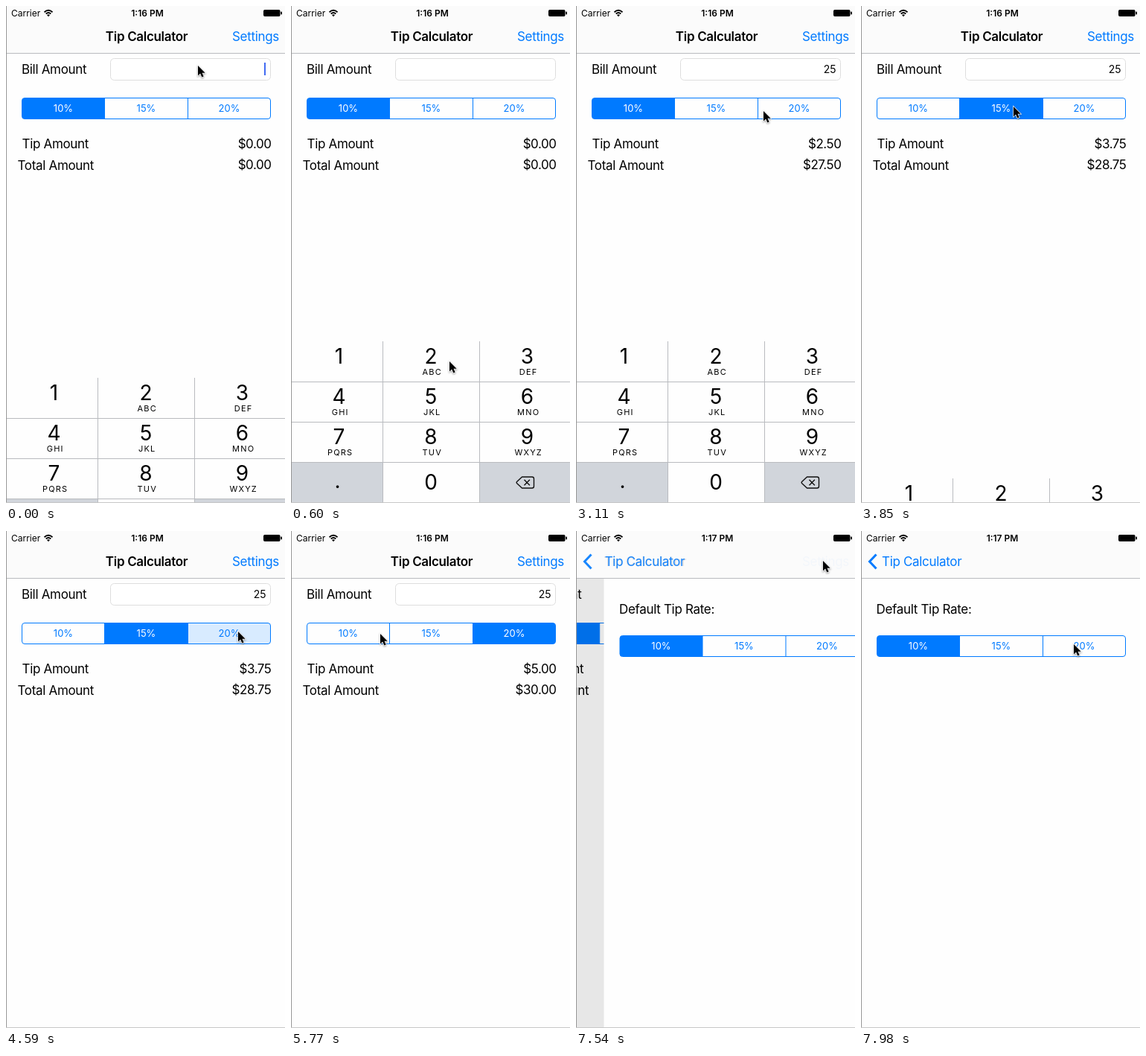
An HTML page for the animation above (8 s loop, 375 by 667 pixels).

```html
<!DOCTYPE html>
<html lang="en">
<head>
<meta charset="utf-8">
<title>Tip Calculator</title>
<style>
  html, body { margin: 0; width: 100%; height: 100%; overflow: hidden; background: #fefefe; }
  svg { display: block; width: 375px; height: 667px; font-family: Inter, Roboto, sans-serif; }
  .body { font-size: 17px; letter-spacing: -.32px; }
  .money { font-size: 17px; letter-spacing: -.45px; text-anchor: end; }
  .title { font-weight: 600; }
  .link { fill: #007aff; }
  .mid { text-anchor: middle; }
  .seg { font-size: 13px; text-anchor: middle; }
  .digit { font-size: 28px; text-anchor: middle; }
  .letters { font-size: 11px; letter-spacing: 1.2px; text-anchor: middle; }
  .status { font-size: 12px; }
  .line { fill: none; stroke: #b9bbbf; }
</style>
</head>
<body>
<svg id="stage" viewBox="0 0 375 667"></svg>
<script>
const LOOP = 8000, BLUE = '#007aff', KEY_GRAY = '#d1d5db';
const RATES = [10, 15, 20], SEG_X = [21.5, 132.5, 244.5, 355.5];
const COL_X = [1, 123.5, 253.5, 375], ROW_Y = [449, 504.5, 558.5, 612.5, 667];

// Each track is a list of [time, value]; a value holds until the next time.
const tracks = {
  cursor: [
    [0, [258, 80]], [150, [252, 160]], [300, [234, 320]], [450, [218, 440]], [600, [213, 477]],
    [740, [209, 477]], [890, [207, 476]], [1490, [207, 484]], [1640, [206, 502]],
    [1780, [204, 520]], [1930, [202, 530]], [2080, [201, 533]], [2820, [214, 440]],
    [2970, [240, 250]], [3110, [252, 141]], [3260, [218, 136]], [3410, [205, 135]],
    [4000, [225, 135]], [4150, [285, 135]], [4290, [312, 135]],
    [5340, [290, 136]], [5490, [205, 138]], [5640, [120, 138]], [5780, [84, 137]],
    [6220, [92, 136]], [6360, [160, 130]], [6500, [247, 98]], [6650, [301, 63]],
    [6800, [326, 45]], [6950, [332, 40]], [7690, [327, 62]], [7840, [302, 126]], [7980, [286, 152]]
  ],
  keypad: [[0, 49], [150, 14], [300, 3], [450, 0], [3700, 90], [3850, 184], [4000, 230]],
  caret: [[0, 1], [450, 0], [890, 1], [1640, 0], [2080, 1], [2970, 0], [3410, 1], [3560, 0]],
  bill: [[0, ''], [1190, '2'], [2530, '25']],
  key: [[0, ''], [1040, '2'], [1190, ''], [2380, '5'], [2530, '']],
  rate: [[0, 0], [3560, 1], [4740, 2], [6070, 0]],
  pressed: [[0, -1], [3410, 1], [3560, -1], [4590, 2], [4740, -1], [5930, 0], [6070, -1]],
  settings: [[0, 1], [7100, .3]],
  clock: [[0, '1:16 PM'], [7100, '1:17 PM']],
  push: [[0, 0], [7240, .08], [7390, .5], [7540, .9], [7690, .985], [7840, 1]]
};
const at = (track, time) => track.findLast(step => step[0] <= time)[1];

const text = (x, y, cls, content, id = '') =>
  `<text x="${x}" y="${y}" class="${cls}"${id && ` id="${id}"`}>${content}</text>`;
const rect = (x, y, w, h, fill, extra = '') =>
  `<rect x="${x}" y="${y}" width="${w}" height="${h}" fill="${fill}" ${extra}/>`;

function segments(y, name) {
  const fills = RATES.map((_, i) =>
    rect(SEG_X[i], y, SEG_X[i + 1] - SEG_X[i], 28, 'none', `id="${name}Fill${i}"`)).join('');
  const labels = RATES.map((rate, i) =>
    text((SEG_X[i] + SEG_X[i + 1]) / 2, y + 18.7, 'seg', rate + '%', name + 'Label' + i)).join('');
  return `<clipPath id="${name}Clip">${rect(21.5, y, 334, 28, '#000', 'rx="3.5"')}</clipPath>
    <g clip-path="url(#${name}Clip)">${fills}</g>
    ${rect(21.5, y, 334, 28, 'none', `rx="3.5" stroke="${BLUE}"`)}
    <path d="M132.5 ${y}v28M244.5 ${y}v28" stroke="${BLUE}"/>${labels}`;
}

function keypad() {
  const letters = ['', 'ABC', 'DEF', 'GHI', 'JKL', 'MNO', 'PQRS', 'TUV', 'WXYZ'];
  const centers = [64.5, 188, 317.5];
  const keys = letters.map((label, i) => {
    const col = i % 3, row = Math.floor(i / 3), base = 480 + row * 54;
    return rect(COL_X[col], ROW_Y[row], COL_X[col + 1] - COL_X[col],
        ROW_Y[row + 1] - ROW_Y[row], 'none', `id="key${i + 1}"`) +
      text(centers[col], base, 'digit', i + 1) +
      text(centers[col] + 1.7, base + 15, 'letters', label);
  }).join('');
  return rect(0, 449, 375, 218, '#fefefe') +
    rect(0, 612.5, 123.5, 55, KEY_GRAY) + rect(253.5, 612.5, 122, 55, KEY_GRAY) + keys +
    text(62.5, 647, 'digit', '.') + text(188, 649, 'digit', '0') +
    `<path class="line" d="M0 504.5H375M0 558.5H375M0 612.5H375M123.5 450V667M253.5 450V667"/>
    <path d="M310.5 632H324q2.5 0 2.5 2.5v10q0 2.500-2.500 2.500H310.500L303.500 640.500q-.8-1 0-2zM313.500 635.800l7.400 7.400m0-7.400l-7.400 7.400"
      fill="none" stroke="#111" stroke-width="1.4" stroke-linejoin="round"/>`;
}

const statusBar = text(7, 14, 'status', 'Carrier') +
  `<g fill="none" stroke="#000" stroke-width="1.8">
    <path d="M51.500 8.200q5.500-4.800 11 0M53.700 10.500q3.300-2.900 6.600 0"/></g>
  <path d="M55 12q2-1.500 4 0l-2 2.200z"/>` +
  text(190, 14, 'status title mid', '', 'clock') +
  rect(346.5, 5.5, 21.5, 8, '#000', 'rx="1" stroke="#000"') + rect(369.3, 7.5, 1.7, 4, '#000', 'rx=".8"');

const stage = document.getElementById('stage');
stage.innerHTML = `
  ${rect(0, 0, 375, 667, '#fefefe')}
  <g id="home">
    ${text(21, 91, 'body', 'Bill Amount')}
    ${rect(140.5, 70.5, 215, 29, '#fff', 'rx="5" stroke="#dedede"')}
    <text id="bill" x="349.5" y="90" font-size="14" text-anchor="end"></text>
    ${rect(347, 76, 2, 17, '#426bf2', 'id="caret"')}
    ${segments(123.5, 'tip')}
    ${text(21.5, 191, 'body', 'Tip Amount')}${text(356.5, 191, 'money', '', 'tip')}
    ${text(15.5, 220, 'body', 'Total Amount')}${text(356.5, 219, 'money', '', 'total')}
    <g id="keypad">${keypad()}</g>
    ${rect(0, 64, 375, 603, '#000', 'id="dim"')}
  </g>
  <g id="detail">
    ${rect(0, 64, 375, 603, '#fefefe')}
    ${text(20.5, 111, 'body', 'Default Tip Rate:')}
    ${segments(140.5, 'default')}
  </g>
  ${rect(0, 0, 375, 63, '#fbfbfb')}
  <path d="M0 63.500H375" class="line"/>
  ${statusBar}
  ${text(189, 47, 'body title mid', 'Tip Calculator', 'title')}
  ${text(304, 47, 'body link', 'Settings', 'settings')}
  <g id="back">
    <path id="chevron" d="M20.500 31.500L11.500 41l9 9.500" fill="none" stroke="${BLUE}" stroke-width="3"/>
    ${text(28, 47, 'body link', 'Tip Calculator', 'backLabel')}
  </g>
  ${rect(0, 0, 1, 667, '#999')}${rect(0, 666, 375, 1, '#c8c8c8')}
  <path id="cursor" d="M0 0V13.500L3.100 10.600L5.300 15.600L7.700 14.600L5.500 9.700H9.700Z"
    stroke="#fff" stroke-width="1.4" paint-order="stroke" style="filter:drop-shadow(0 1px 1px #0006)"/>`;

const el = Object.fromEntries([...stage.querySelectorAll('[id]')].map(node => [node.id, node]));
const set = (id, name, value) => el[id].setAttribute(name, value);
const move = (id, x, y = 0) => set(id, 'transform', `translate(${x} ${y})`);

function paintSegments(name, selected, pressed) {
  RATES.forEach((_, i) => {
    set(name + 'Fill' + i, 'fill', i === selected ? BLUE : i === pressed ? '#d8ebff' : '#fefefe');
    set(name + 'Label' + i, 'fill', i === selected ? '#fff' : BLUE);
  });
}

function render(time) {
  const s = Object.fromEntries(Object.entries(tracks).map(([name, track]) => [name, at(track, time)]));
  const bill = Number(s.bill), tip = bill * RATES[s.rate] / 100;
  el.bill.textContent = s.bill;
  el.tip.textContent = '$' + tip.toFixed(2);
  el.total.textContent = '$' + (bill + tip).toFixed(2);
  el.clock.textContent = s.clock;
  set('caret', 'opacity', s.caret);
  paintSegments('tip', s.rate, s.pressed);
  for (let i = 1; i <= 9; i++) set('key' + i, 'fill', s.key === String(i) ? KEY_GRAY : 'none');

  move('keypad', 0, s.keypad);
  move('home', -112 * s.push);
  move('detail', 375 * (1 - s.push));
  move('title', -107 * s.push);
  move('backLabel', 107 * (1 - s.push));
  set('dim', 'opacity', .1 * s.push);
  set('title', 'opacity', 1 - s.push);
  set('settings', 'opacity', s.settings * (1 - s.push));
  set('back', 'opacity', s.push);
  move('cursor', ...s.cursor);
}

paintSegments('default', 0, -1);
const start = performance.now();
function tick() {
  render((performance.now() - start) % LOOP);
  requestAnimationFrame(tick);
}
tick();
</script>
</body>
</html>
```
